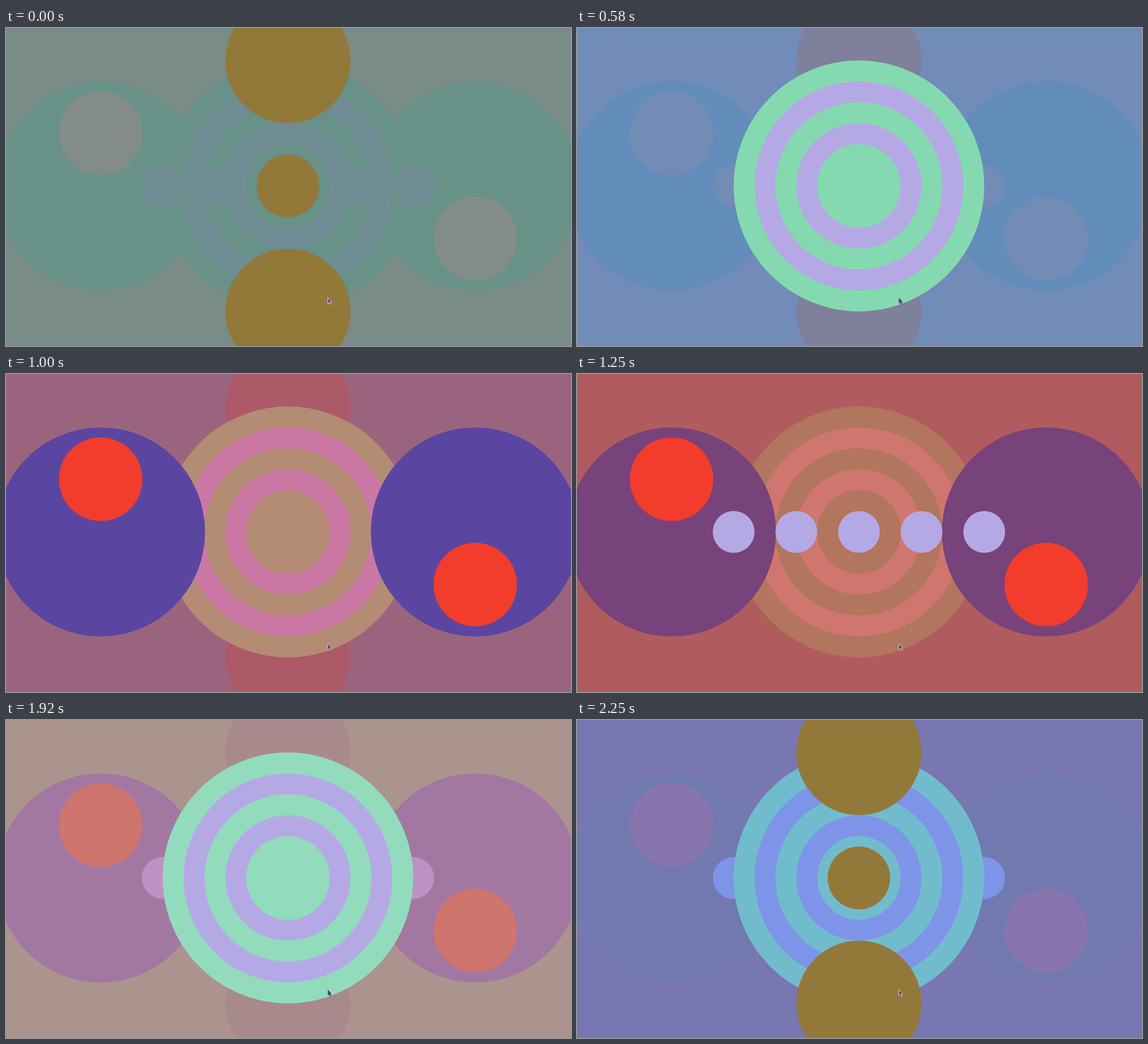
These frames come from a looping animation (998 px wide and 561 px high, 2.33 s). An HTML page with a canvas:

```html
<!DOCTYPE html>
<html lang="en">
<head>
<meta charset="utf-8">
<title>Circles</title>
<style>
  html, body { margin: 0; width: 100%; height: 100%; overflow: hidden; background: #7a8c87; }
  canvas { display: block; }
</style>
</head>
<body>
<canvas id="stage" width="998" height="561"></canvas>
<script>
const ctx = document.getElementById('stage').getContext('2d');
const LOOP = 2330, STEP = 1000 / 12;
const CX = 498, CY = 278.6, U = 36.88;

// Colour keys per layer: step, colour. Adjacent steps make a hard hit.
const tracks = {
  back: '0 7a8c87 7 718cb9 12 9b647e 15 b05c5e 19 b07864 23 ac948e 27 7977b2',
  gold: '0 92793a 3 92793a 7 7f809b 12 ac5a68 15 b05c5e 19 b4765c 23 a88a8c 24 a0868f 25 92793a',
  side: '0 689187 7 628cb9 9 7380a8 10 5a46a0 12 5a46a0 15 78427a 19 955d78 23 a278a2 27 7179b0',
  red: '0 848c8a 7 738cb6 9 827ca1 10 f23d2c 15 f23d2c 19 e0583a 23 ce756e 27 8875ae',
  green: '0 689187 3 6690a0 4 85d9b0 9 85d9b0 12 b48c73 15 b2755d 16 b2765e 17 80d9a8 19 80d9a8 23 92dcbd 24 92dcbd 27 71bccc',
  lilac: '0 708c94 3 718ca6 4 b5a9e5 9 b5a9e5 12 cc78a5 15 cf7670 16 cc786f 17 b5a9e5 24 b5a9e5 27 7e94e9',
  dots: '0 708c94 7 738cb6 12 9b647e 13 a2626f 14 b5a9e5 16 b5a9e5 19 be91be 23 be91c5 27 7e94e9'
};

// Stacking order from each step on, and the pointer's edge.
const stages = [
  [0, 'side red rings dots gold', '#dccde6'],
  [4, 'gold side red dots rings', 'green'],
  [10, 'gold dots rings side red', '#c8bfe0'],
  [14, 'gold rings side red dots', '#c8bfe0'],
  [17, 'gold side red dots rings', 'green'],
  [25, 'side red dots rings gold', '#dccde6']
];

const rgb = hex => [0, 2, 4].map(i => parseInt(hex.substr(i, 2), 16));
const keys = {};
for (const name in tracks) {
  const parts = tracks[name].split(' ');
  keys[name] = [];
  for (let i = 0; i < parts.length; i += 2) keys[name].push([+parts[i], rgb(parts[i + 1])]);
}

function colour(name, step) {
  const list = keys[name];
  const i = list.findIndex(k => k[0] > step);
  if (i < 0) return `rgb(${list[list.length - 1][1]})`;
  const [t0, a] = list[i - 1], [t1, b] = list[i];
  const p = (step - t0) / (t1 - t0);
  return `rgb(${a.map((v, c) => Math.round(v + (b[c] - v) * p))})`;
}

// Position and radius in units from the centre.
function disc(x, y, r) {
  ctx.beginPath();
  ctx.arc(CX + x * U, CY + y * U, r * U, 0, Math.PI * 2);
  ctx.fill();
}

const shapes = {
  gold() { disc(0, -6, 3); disc(0, 0, 1.5); disc(0, 6, 3); },
  side() { disc(-8.97, 0, 5); disc(8.97, 0, 5); },
  red() { disc(-8.97, -2.52, 2); disc(8.97, 2.52, 2); },
  dots() { for (let x = -6; x <= 6; x += 3) disc(x, 0, 1); },
  rings(step) {
    for (let r = 6; r >= 2; r--) {
      ctx.fillStyle = colour(r % 2 ? 'lilac' : 'green', step);
      disc(0, 0, r);
    }
  }
};

const arrow = new Path2D('M568.5 475.5v11l2.4-2.3 1.6 3.6 1.9-.8-1.6-3.5h2.7z');

function draw(step) {
  ctx.fillStyle = colour('back', step);
  ctx.fillRect(0, 0, 998, 561);
  const [, order, edge] = stages.filter(s => s[0] <= step).pop();
  for (const name of order.split(' ')) {
    if (name !== 'rings') ctx.fillStyle = colour(name, step);
    shapes[name](step);
  }
  ctx.fillStyle = '#63386f';
  ctx.strokeStyle = edge === 'green' ? colour('green', step) : edge;
  ctx.fill(arrow);
  ctx.lineWidth = 1;
  if (edge !== 'green') ctx.stroke(arrow);
}

const start = performance.now();
function tick() {
  const t = Math.max(0, performance.now() - start) % LOOP;
  draw(Math.min(27, Math.floor((t + 3.4) / STEP)));
  requestAnimationFrame(tick);
}
tick();
</script>
</body>
</html>
```
